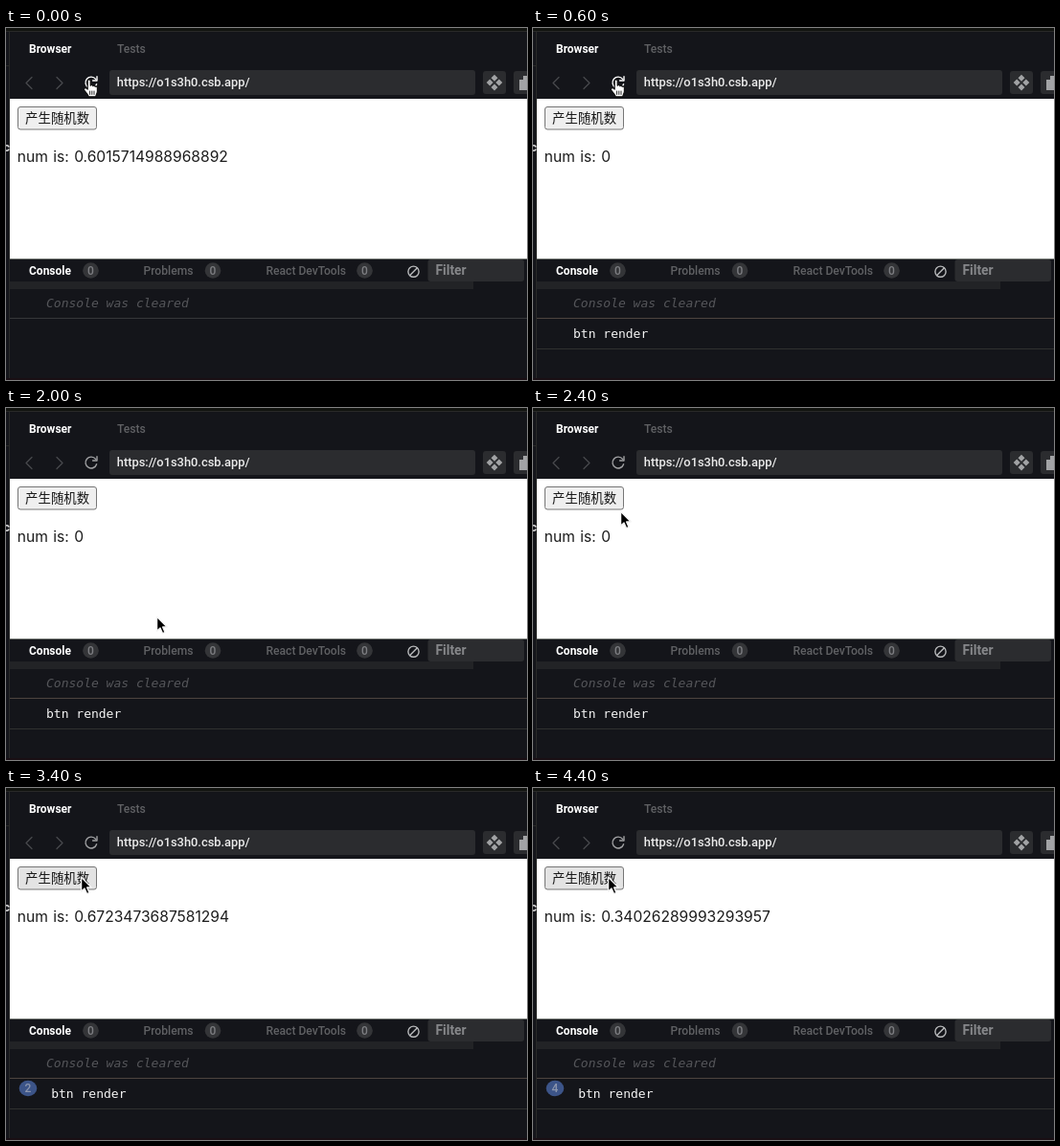
Recreate the animation shown at these times as an HTML page. Size 544 by 368 pixels, loop 4.6 s.

```html
<!DOCTYPE html>
<html lang="zh">
<head>
<meta charset="utf-8">
<title>Random number demo</title>
<style>
html, body { margin: 0; width: 100%; height: 100%; overflow: hidden; background: #14151a; }
svg { display: block; width: 544px; height: 368px; }
text { white-space: pre; }
.ui { font: 500 12.1px Roboto, sans-serif; fill: #606164; }
.ui.on { font-weight: 700; font-size: 12px; fill: #fff; }
.url { font: 500 12.85px Roboto, sans-serif; fill: #ececec; }
.filter { font: 700 13.8px Roboto, sans-serif; fill: #86878a; }
.count { font: 500 12px Roboto, sans-serif; fill: #7d7e82; text-anchor: middle; }
.page { font: 400 15.6px Inter, sans-serif; word-spacing: 1px; fill: #1c1c1c; }
.btn { font: 400 13.4px "Noto Sans CJK SC", "Noto Sans CJK", sans-serif; fill: #151515; text-anchor: middle; }
.mono { font: 400 13px "DejaVu Sans Mono", monospace; fill: #f6f6f6; }
.muted { font-style: italic; fill: #55565a; }
.line { fill: none; stroke-linecap: round; stroke-linejoin: round; }
</style>
</head>
<body>
<svg viewBox="0 0 544 368">
  <rect width="544" height="368" fill="#14151a"/>
  <rect width="544" height="3" fill="#11130f"/>
  <path d="M0 3.5H544M3.5 3V366M0 39.5H3" stroke="#292a28" fill="none"/>

  <text class="ui on" x="24" y="26">Browser</text>
  <text class="ui" x="116" y="26">Tests</text>

  <g class="line" stroke="#48494d" stroke-width="1.3">
    <path d="M27 51.5L21 57.5L27 63.5"/>
    <path d="M53 51.5L59 57.5L53 63.5"/>
  </g>
  <g id="reload" class="line" stroke-width="1.4">
    <path d="M93.6 53.4A5.9 5.9 0 1 0 94.6 58.8"/>
    <path d="M95 50.8V55H90.6"/>
  </g>
  <rect x="108" y="44" width="382" height="26" rx="3" fill="#2b2c2f"/>
  <text class="url" x="115.8" y="61">https://o1s3h0.csb.app/</text>

  <rect x="498" y="45" width="24" height="24" rx="3" fill="#2b2c2f"/>
  <path fill="#a2a3a5" d="M510 48.8l3.5 3.5-3.5 3.5-3.5-3.5zM505.2 53.6l3.5 3.5-3.5 3.5-3.5-3.5zM514.8 53.6l3.5 3.5-3.5 3.5-3.5-3.5zM510 58.4l3.5 3.5-3.5 3.5-3.5-3.5z"/>
  <rect x="530" y="45" width="20" height="24" rx="3" fill="#2b2c2f"/>
  <path d="M536 54H540V50H548V65H536Z" fill="#a2a3a5"/>

  <rect x="4" y="74" width="540" height="167" fill="#fff"/>
  <path d="M4 241.5H544" stroke="#6f746f"/>
  <text x="-2.8" y="128.5" font-family="Roboto, sans-serif" font-size="13" font-weight="700" fill="#ddd">c</text>
  <rect id="button" x="12.5" y="82.5" width="82" height="23.5" rx="2.5" stroke="#767676"/>
  <text class="btn" x="53.6" y="99">产生随机数</text>
  <text id="num" class="page" x="11.8" y="139.7"></text>

  <text class="ui on" x="24" y="257.5">Console</text>
  <text class="ui" x="143.6" y="257.5">Problems</text>
  <text class="ui" x="271.5" y="257.5">React DevTools</text>
  <g fill="#343538">
    <circle cx="88.5" cy="253.5" r="8.3"/>
    <circle cx="216" cy="253.5" r="8.3"/>
    <circle cx="374.5" cy="253.5" r="8.3"/>
  </g>
  <text class="count" x="88.5" y="257.5">0</text>
  <text class="count" x="216" y="257.5">0</text>
  <text class="count" x="374.5" y="257.5">0</text>
  <g class="line" stroke="#b9babc" stroke-width="1.4">
    <circle cx="425.5" cy="254.7" r="5.6"/>
    <path d="M421.8 258.5L429.2 250.9"/>
  </g>
  <rect x="440.5" y="242" width="100.5" height="23" rx="3" fill="#2b2c2f"/>
  <text class="filter" x="448.5" y="258">Filter</text>

  <rect x="4" y="265" width="484" height="8" fill="#222326"/>
  <text class="mono muted" x="42" y="292">Console was cleared</text>
  <path id="rule" d="M4 303.5H544"/>
  <g id="log">
    <path d="M4 335.5H544" stroke="#303030"/>
    <text id="entry" class="mono" y="324"></text>
  </g>
  <g id="badge">
    <ellipse cx="23" cy="314" rx="9.3" ry="8.3" fill="#3c5488"/>
    <text id="hits" class="count" x="23" y="318" style="fill:#8b95ad"></text>
  </g>
  <rect y="366" width="544" height="2" fill="#190f14"/>

  <g id="hand" stroke="#111" stroke-linejoin="round" stroke-linecap="round">
    <path stroke-width="1.2" fill="#fff"
      d="M85.2 64V55.4C85.2 53.4 88.2 53.4 88.2 55.4V60.2C88.6 58.9 90.6 59.1 90.8 60.6C91.4 59.6 93 60 93.2 61.3C94 60.6 95.4 61.2 95.4 62.6V66.3C95.4 68.2 94 69.5 93.7 71.8H86.3C85.6 69.4 83.4 67.6 81.7 65C80.8 63.3 82.8 62 84 63Z"/>
    <path stroke-width=".9" d="M87.6 66V69.5M89.8 66V69.5M92 66V69.5"/>
  </g>
  <path id="arrow" fill="#000" stroke="#f4f4f4" stroke-width="1.3" stroke-linejoin="round"
    d="M.6 .4V15.2L4 12L6.5 17.6L9 16.5L6.6 11H11.2Z"/>
</svg>
<script>
const LOOP = 4600;
const RELOADED = 600, LEAVE = 1200, HOVER = 2600;

// [start ms, shown number, render count]
const states = [
  [0, "0.6015714988968892", 0],
  [RELOADED, "0", 1],
  [2800, "0.6723473687581294", 2],
  [3600, "0.4479589848622558", 3],
  [4000, "0.34026289993293957", 4]
];

// [start ms, x, y] of the arrow tip
const path = [
  [LEAVE, 178, 196],
  [1400, 240, 293],
  [1600, 237, 290],
  [1800, 230, 286],
  [2000, 157, 218],
  [2200, 140, 180],
  [2400, 91, 108],
  [HOVER, 78, 93]
];

const el = id => document.getElementById(id);
const at = (table, t) => table.filter(row => row[0] <= t).pop();
const show = (id, on) => el(id).setAttribute("visibility", on ? "visible" : "hidden");

function draw(t) {
  const [, num, hits] = at(states, t);
  el("num").textContent = "num is: " + num;
  el("hits").textContent = hits;
  el("entry").textContent = "btn render";
  el("entry").setAttribute("x", hits > 1 ? 47.2 : 42);
  show("log", hits > 0);
  show("badge", hits > 1);
  el("rule").setAttribute("stroke", hits ? "#4d443f" : "#363739");

  const tip = at(path, t);
  show("hand", !tip);
  show("arrow", tip);
  if (tip) el("arrow").setAttribute("transform", `translate(${tip[1]} ${tip[2]})`);
  el("reload").setAttribute("stroke", tip ? "#a0a1a3" : "#fff");
  el("button").setAttribute("fill", t >= HOVER ? "#e3e3e3" : "#efefef");
}

const start = performance.now();
function tick() {
  draw((performance.now() - start) % LOOP);
  requestAnimationFrame(tick);
}
tick();
</script>
</body>
</html>
```
